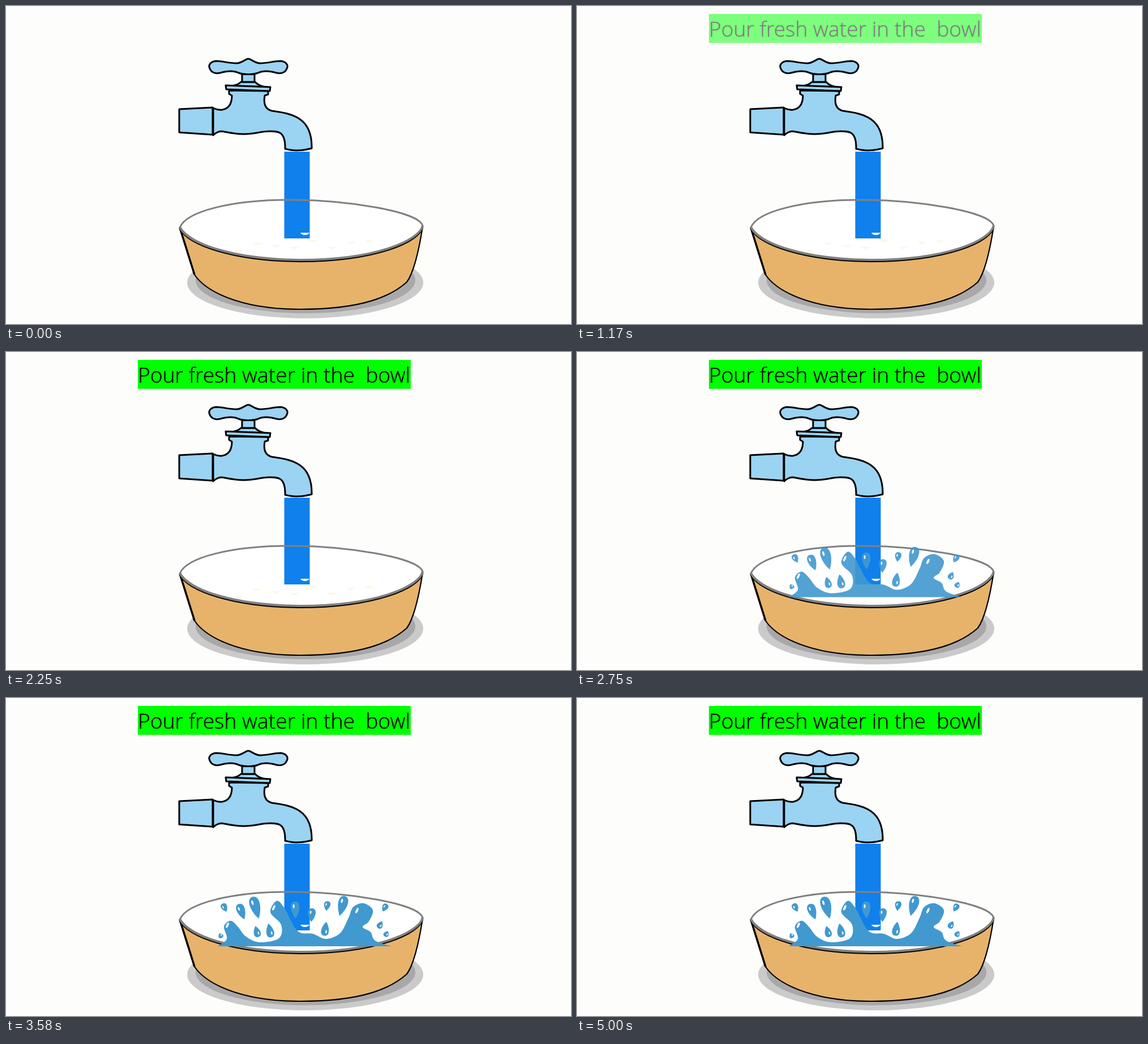
Animation, 998 px wide and 561 px high, one loop 5080 ms. Source, as an HTML page:

```html
<!DOCTYPE html>
<html lang="en">
<head>
<meta charset="utf-8">
<title>Pour fresh water in the bowl</title>
<style>
  html, body { margin: 0; width: 100%; height: 100%; overflow: hidden; background: #fdfdfc; }
  svg { display: block; width: 100%; height: 100%; }
  text { font: 300 37.25px "Open Sans", sans-serif; white-space: pre; stroke: #000; stroke-width: .4; }
  .tap { fill: #9bd3f3; stroke: #000; stroke-width: 3; stroke-linejoin: round; }
  .line { fill: none; }
</style>
</head>
<body>
<svg viewBox="0 0 998 561">
  <defs>
    <path id="front" d="M736 388C731 415 652 449 520 449C400 448 322 420 307 391"/>
    <path id="handle" d="M428 93C434 94 440 101 449 101C462 101 474 97 485 97C494 98 498 103 497 108C494 118 486 120 478 118C468 115 455 113 445 118Q439 120.5 428 120.5"/>
  </defs>

  <g id="caption">
    <rect x="233" y="14" width="482" height="51" fill="#0f0"/>
    <text x="233" y="54">Pour fresh water in the  bowl</text>
  </g>

  <!-- bowl -->
  <ellipse cx="528.5" cy="488" rx="208.5" ry="63" fill="#cacaca"/>
  <ellipse cx="529" cy="484" rx="194" ry="58" fill="#a8a8a8"/>
  <path d="M307 391L333 474C352 502 410 535 520 535S680 512 708 487Q724 465 736 389Z" fill="#e7b36b" stroke="#000" stroke-width="2.2"/>
  <path d="M307 391L333 474" stroke="#000" stroke-width="3.5"/>
  <path d="M307 391C318 362 400 342 500 342S730 362 736 388C731 415 652 449 520 449C400 448 322 420 307 391" fill="#fff"/>
  <g id="specks" fill="#f8f1d2"></g>
  <rect x="491.5" y="257" width="45" height="153" fill="#0f80ec"/>
  <path d="M520 400h16q-2 4-8 4t-8-4Z" fill="#fff"/>
  <path class="line" d="M307 391C318 362 400 342 500 342S730 362 736 388" stroke="#808080" stroke-width="3"/>
  <use class="line" href="#front" y="1.5" stroke="#000" stroke-width="3"/>
  <use class="line" href="#front" y="-1" stroke="#808080" stroke-width="4"/>

  <!-- tap -->
  <g class="tap">
    <path d="M366 180Q374 184 382 183Q399 180 399 158L394 155V149L463 150V156L457 158Q453 181 470 185C508 190 541 198 540 251Q516 258 493 252C494 220 480 221 465 221S440 226 420 226S385 221 380 221Q372 222 366 228Z"/>
    <path d="M306 182L365 179V227L306 223Z"/>
    <path d="M396 141Q409 140 415 134H440Q447 142 461 143Z"/>
    <path d="M388 140L467 143L466 150L389 147Z"/>
    <path d="M417 120H439V134H417Z"/>
    <use href="#handle"/>
    <use href="#handle" transform="matrix(-1 0 0 1 856 0)"/>
  </g>

  <g id="splash" fill="#4199cf"></g>
</svg>
<script>
const LOOP = 5080;
const byId = id => document.getElementById(id);
const caption = byId('caption'), splash = byId('splash');
const ramp = (t, start, length) => Math.min(1, Math.max(0, (t - start) / length));

// smooth curve through points, closed by a straight base
function smooth(points) {
  const at = i => points[Math.min(points.length - 1, Math.max(0, i))];
  const handle = (i, sign) => at(i).map((v, k) => v + sign * (at(i + 1)[k] - at(i - 1)[k]) / 6);
  return `M${at(0)}` + points.slice(1).map((p, i) =>
    `C${handle(i, 1)} ${handle(i + 1, -1)} ${p}`).join('') + 'Z';
}

// teardrop that leans away from the stream; falling ones hang point up
function drop(x, y, size, falling) {
  const r = 3 + size * .15, top = -size / 2;
  const turn = (x - 520) * .2 + (falling ? 180 : 0);
  const shineY = top + r * 1.1;
  return `<g transform="translate(${x} ${y}) rotate(${turn})">
    <path d="M0 ${top}C${r * 1.4} ${top} ${r * 1.3} ${top + size * .55} 0 ${-top}C${-r * 1.3} ${top + size * .55} ${-r * 1.4} ${top} 0 ${top}"/>
    <ellipse cx="${-r * .35}" cy="${shineY}" rx="${r * .2}" ry="${r * .45}" fill="#fff"/></g>`;
}

const shine = (x, y) =>
  `<ellipse cx="${x}" cy="${y}" rx="2" ry="5" fill="#fff" transform="rotate(25 ${x} ${y})"/>`;

const wave = [
  [374, 438], [390, 425], [385, 403], [397, 393], [410, 404], [424, 421], [448, 431],
  [482, 424], [486, 400], [467, 378], [478, 358], [492, 371], [515, 411], [542, 416],
  [565, 425], [590, 415], [605, 388], [613, 369], [631, 362], [648, 374], [641, 394],
  [630, 404], [644, 413], [652, 428], [680, 438]
];
const flying = [[386, 370, 16], [416, 377, 29], [441, 370, 40], [511, 374, 30],
  [540, 383, 24], [567, 367, 17], [594, 367, 36], [669, 370, 15]];
const falling = [[379, 419, 9], [443, 412, 20], [466, 410, 25], [564, 407, 25],
  [661, 400, 14], [672, 416, 11]];

splash.innerHTML = `<path d="${smooth(wave)}"/>`
  + flying.map(d => drop(...d, false)).join('')
  + falling.map(d => drop(...d, true)).join('')
  + shine(391, 401) + shine(473, 370) + shine(620, 375);

for (let i = 0; i < 8; i++) {
  const x = 410 + 33 * i, y = 424 - i + 7 * Math.cos(2.4 * i);
  byId('specks').innerHTML += `<path d="M${x - 6} ${y}h14v1h-14zm3 2h8v1h-8z"/>`;
}

function draw(now) {
  const t = now % LOOP;
  caption.setAttribute('opacity', ramp(t, 920, 500));

  // float down into place, then one pulse that swells and dims
  const arrive = ramp(t, 2300, 500);
  const swell = 1 - Math.abs(2 * ramp(t, 3620, 500) - 1);
  const dim = Math.min(.5, swell * 1.25);
  splash.setAttribute('opacity', arrive * (1 - dim));
  splash.setAttribute('transform',
    `translate(526.5 ${394 - 56 * (1 - arrive)}) scale(${1 + .05 * swell}) translate(-526.5 -394)`);
  requestAnimationFrame(draw);
}
requestAnimationFrame(draw);
</script>
</body>
</html>
```
